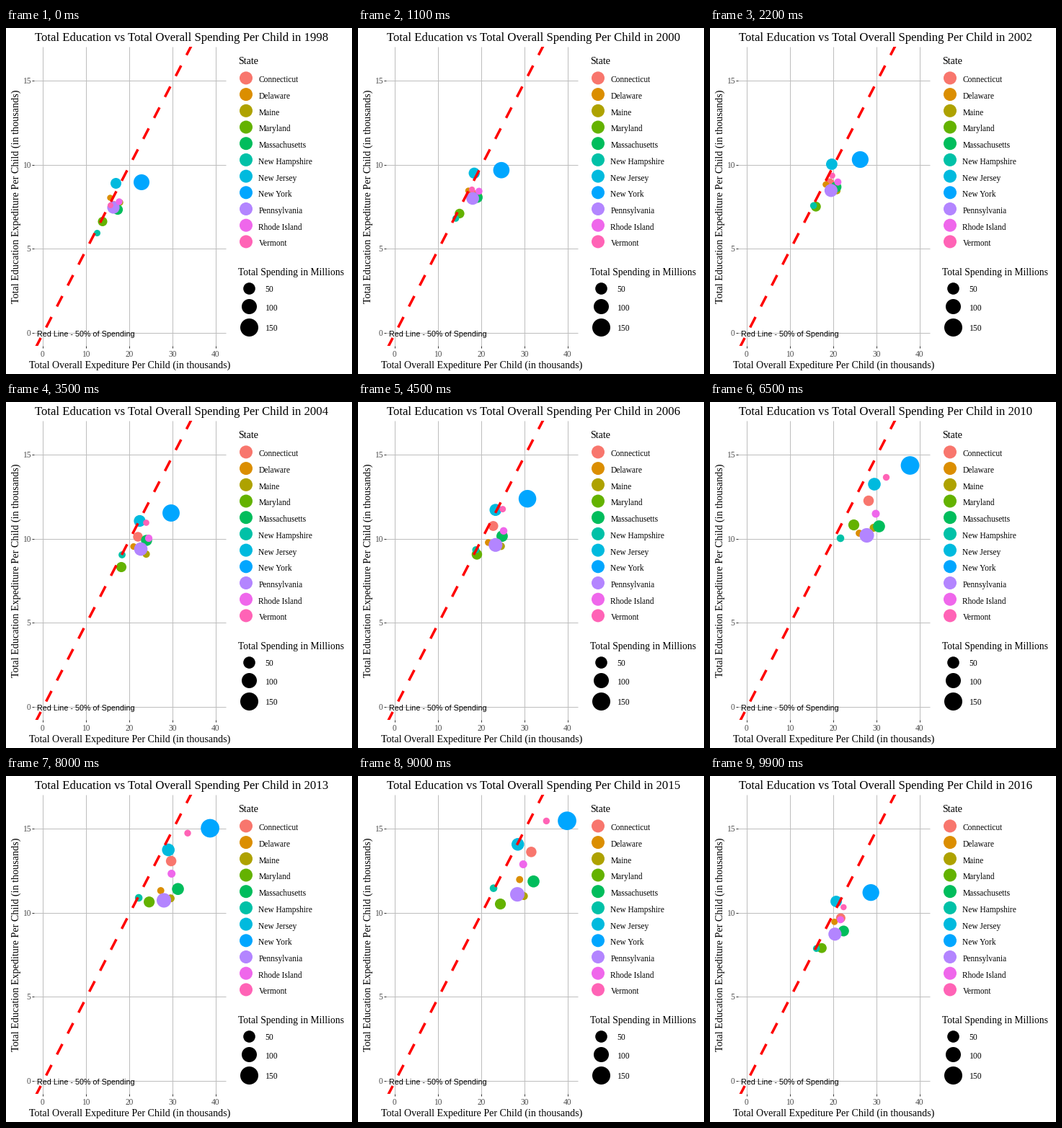
A matplotlib script for the animation above (10 s loop, 480 px wide and 480 px high).

```python
import numpy as np
import matplotlib.pyplot as plt
from matplotlib.animation import FuncAnimation
from matplotlib.patches import Circle, Rectangle

SIZE, DPI = 480, 72            # at 72 dpi one point is one pixel
FRAMES, INTERVAL = 100, 100
FIRST_YEAR, YEARS = 1998, 19
LEFT, TOP, RIGHT, BOTTOM = 39, 26, 305, 441
X0, Y0, X_UNIT, Y_UNIT = 51, 423, 6, 23.28
SERIF, SANS = "Liberation Serif", "Liberation Sans"

fig = plt.figure(figsize=(SIZE / DPI, SIZE / DPI), dpi=DPI, facecolor="white")
ax = fig.add_axes([0, 0, 1, 1])
ax.set_xlim(0, SIZE)
ax.set_ylim(SIZE, 0)
ax.axis("off")
panel = Rectangle((LEFT, TOP), RIGHT - LEFT, BOTTOM - TOP,
                  fc="none", ec="none")
ax.add_patch(panel)


def label(x, y, text, size, color="black", font=SERIF, **kw):
    return ax.text(x, y, text, fontsize=size, color=color, family=font,
                   va="baseline", zorder=30, **kw)


def line(xs, ys, color, width=1, **kw):
    return ax.plot(xs, ys, color=color, lw=width, solid_capstyle="butt",
                   dash_capstyle="butt", **kw)[0]


def dot(x, y, r, color, zorder=10):
    return ax.add_patch(Circle((x, y), r, fc=color, ec="none", lw=0,
                               zorder=zorder))


# Grid, ticks and tick labels
for value in range(0, 41, 10):
    x = X0 + X_UNIT * value
    line([x, x], [TOP, BOTTOM], "#BEBEBE", zorder=1)
    line([x, x], [BOTTOM, BOTTOM + 3], "#333333", zorder=1)
    label(x, 456, str(value), 11.5, "#4D4D4D", ha="center")
for value in range(0, 16, 5):
    y = int(Y0 - Y_UNIT * value)
    line([LEFT, RIGHT], [y, y], "#BEBEBE", zorder=1)
    line([LEFT - 3, LEFT], [y, y], "#333333", zorder=1)
    label(34.5, y + 4, str(value), 11.5, "#4D4D4D", ha="right")

# Dashed line of slope one half, drawn above the points
width, dash = 3.5, 16.35
ends_y = np.array([444.5, 10])
ends_x = X0 + 0.5 + (Y0 + 0.5 - ends_y) * X_UNIT / (0.5 * Y_UNIT)
half_line = line(ends_x, ends_y, "red", width,
                 dashes=(dash / width, dash / width), zorder=25)
half_line.set_clip_path(panel)

# Titles and note
title = label(244, 18, "", 16.75, ha="center")
label(172, 472, "Total Overall Expediture Per Child (in thousands)", 13.95,
      ha="center")
label(17.5, 234, "Total Education Expediture Per Child (in thousands)", 14.15,
      ha="center", rotation=90, rotation_mode="anchor")
label(43, 428, "Red Line - 50% of Spending", 10.8, font=SANS)

# Legends
label(322, 50, "State", 14)
label(322, 343, "Total Spending in Millions", 13.6)
for amount, y, r in ((50, 361.5, 8.3), (100, 386.5, 10.5), (150, 415.5, 12.5)):
    dot(337.5, y, r, "black")
    label(359.5, y + 5, str(amount), 11.6)

bubbles = []


def state(name, color, radius, *points):
    """Add a legend row and a bubble passing one point every six years."""
    row = len(bubbles)
    y = 69.4 + 22.7 * row
    dot(333, y, 9, color)
    label(350.5, y + 6, name, 11.5)
    bubble = dot(*points[0], radius, color, 11 + row)
    bubble.set_clip_path(panel)
    bubbles.append((bubble, radius, np.array(points)))


state("Connecticut", "#F8766D", 6.2,
      (149, 246), (183, 187), (220, 137), (246, 99))
state("Delaware", "#DB8E00", 4.2,
      (144.5, 235.5), (177, 200.5), (207, 182), (229, 136))
state("Maine", "#AEA200", 4.7,
      (158, 242), (194.5, 211), (227, 174.5), (231, 165))
state("Maryland", "#64B200", 6.5,
      (134, 268.5), (160, 229), (199.5, 170.5), (197, 179))
state("Massachusetts", "#00BD5C", 7.1,
      (155, 252), (195, 192), (234.5, 172.5), (246, 141))
state("New Hampshire", "#00C1A7", 4.5,
      (126.5, 284.5), (161, 212), (181, 189), (190, 149))
state("New Jersey", "#00BADE", 7.5,
      (152.5, 215.5), (185.5, 165), (228, 114), (220, 91))
state("New York", "#00A6FF", 11,
      (188, 214), (229, 154), (277.5, 88), (293.5, 57))
state("Pennsylvania", "#B385FF", 8.6,
      (149, 249), (187, 204), (217.5, 185), (222, 160))
state("Rhode Island", "#EF67EB", 4.7,
      (157, 241), (198, 189), (230, 155), (229, 116))
state("Vermont", "#FF63B6", 4,
      (145, 246), (194.5, 167.5), (244.5, 104.5), (266, 54))

# Shared pace from point to point: overall spending stalls after 2004 and
# jumps by 2010, education spending grows more evenly
PACE_YEARS = (0, 4, 6, 10, 12, 15, 18)
X_PACE = (0, 0.53, 1, 1.25, 2, 2.35, 3)
Y_PACE = (0, 0.56, 1, 1.6, 2, 2.5, 3)

# Each year holds for a moment, then moves on in four (later three) steps
clock, progress, title_starts = [0], [0], []
for k in range(1, YEARS + 1):
    early = k <= 6
    end = 6 * k - 1 if early else 5 * k + 5
    clock += [end - (4 if early else 3), end]
    progress += [k - 1, k]
    if k < YEARS:
        title_starts.append(end - 1 if early else end)


def place(points, year):
    """Position in a whole year; the last one leads back to the first."""
    year %= YEARS
    return np.array([
        np.interp(np.interp(year, PACE_YEARS, pace), range(4), points[:, axis])
        for axis, pace in enumerate((X_PACE, Y_PACE))])


def draw(frame):
    t = np.interp(frame, clock, progress)
    k = int(t + 1e-9)
    growth = np.interp(t, [0, 12, 18, 19], [1, 1.17, 1.17, 1])
    for bubble, radius, points in bubbles:
        a, b = place(points, k), place(points, k + 1)
        bubble.center = a + (b - a) * (t - k)
        bubble.set_radius(radius * growth)
    year = FIRST_YEAR + sum(frame >= start for start in title_starts)
    title.set_text("Total Education vs Total Overall Spending "
                   f"Per Child in {year}")
    return [title] + [b[0] for b in bubbles]


anim = FuncAnimation(fig, draw, frames=FRAMES, interval=INTERVAL,
                     repeat=True, repeat_delay=0, blit=False)
plt.show()
```
